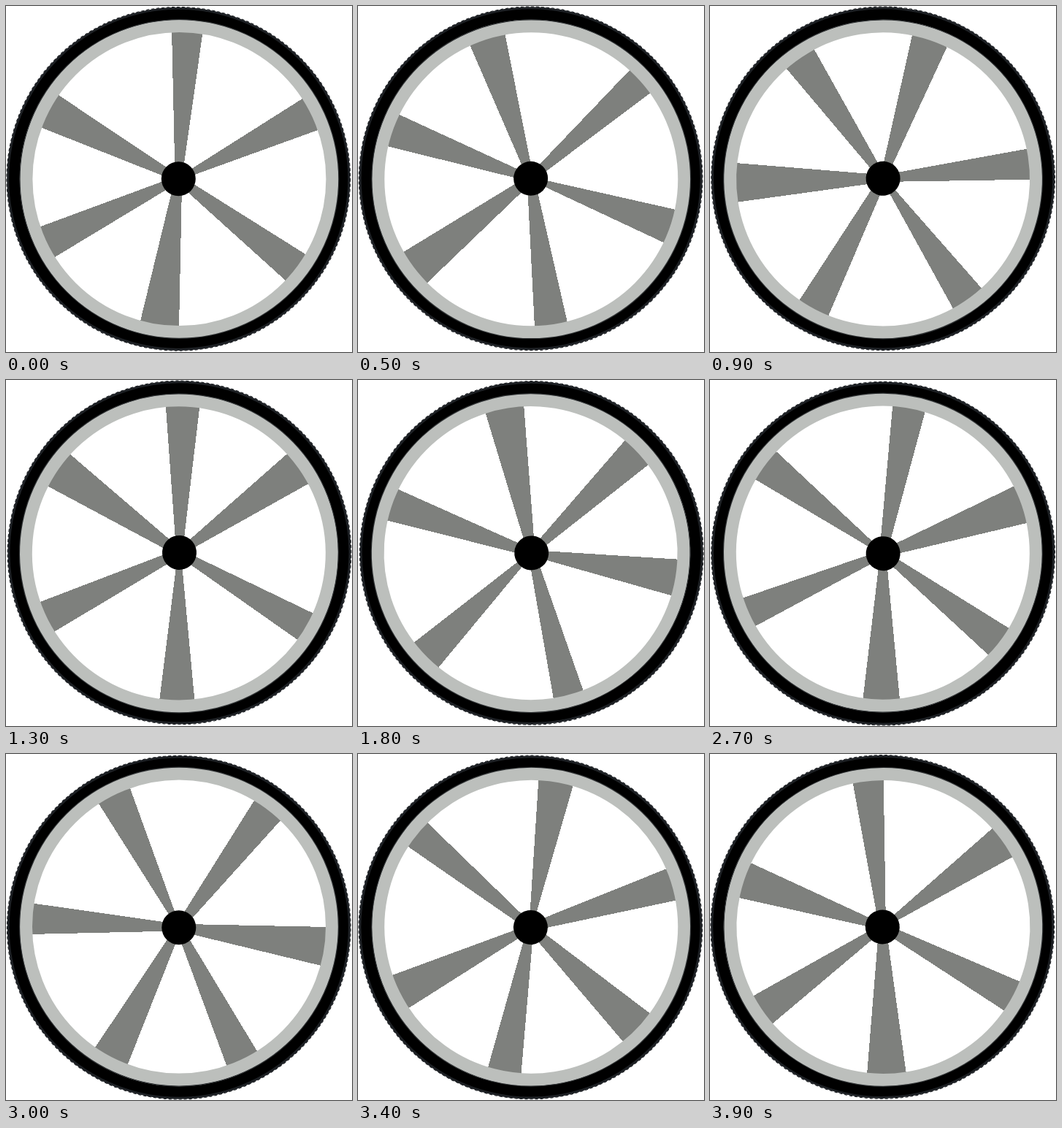
Animation of 474 by 474 pixels, one loop 4 s. Source, as an HTML page:

```html
<!DOCTYPE html>
<html lang="en">
<head>
<meta charset="utf-8">
<title>Turning wheel</title>
<style>
  html, body { margin: 0; width: 100%; height: 100%; overflow: hidden; background: #fff; }
  svg { display: block; width: 100vw; height: 100vh; }
</style>
</head>
<body>
<svg viewBox="0 0 474 474">
  <g id="wheel" fill="none">
    <!-- tyre -->
    <circle r="225.5" stroke="#000" stroke-width="16"/>
    <circle r="233.6" stroke="#1d2024" stroke-width="3"/>
    <circle r="235.3" stroke="#1d2024" stroke-width="1.2" stroke-dasharray="4 3"/>
    <g id="spokes" fill="#7e807d" shape-rendering="crispEdges"></g>
    <!-- rim -->
    <g transform="translate(1.1 .2)">
      <circle r="218.2" stroke="#2e3133" stroke-width="1.6"/>
      <circle r="209.4" stroke="#bcbfbc" stroke-width="16.8"/>
    </g>
    <circle r="23.5" fill="#000"/>
  </g>
</svg>
<script>
const LOOP = 4000, STEP = 100, CENTER = 237;
const HUB_R = 22, RIM_R = 204;

// [direction clockwise from up, half spread at the rim (degrees), half width at the hub]
const SPOKES = [
  [3.4, 6, 6.5], [63.9, 6.8, 4.5], [127.1, 6.4, 7],
  [187.4, 7.6, 7.3], [244.3, 6.6, 6.3], [297.7, 7.2, 6.3]
];

const wheel = document.getElementById('wheel');
const spokes = document.getElementById('spokes');

for (const [dir, spread, root] of SPOKES) {
  const a = spread * Math.PI / 180;
  const x = RIM_R * Math.sin(a), y = -RIM_R * Math.cos(a);
  const p = document.createElementNS('http://www.w3.org/2000/svg', 'path');
  p.setAttribute('d', `M${-root} ${-HUB_R}L${-x} ${y}H${x}L${root} ${-HUB_R}L0 0Z`);
  p.setAttribute('transform', `rotate(${dir})`);
  spokes.append(p);
}

// The wheel sits slightly off its axis, so it wobbles as it turns.
function draw(ms) {
  const step = Math.floor((ms % LOOP) / STEP);
  const angle = step * 360 * STEP / LOOP;
  wheel.setAttribute('transform',
    `translate(${CENTER} ${CENTER}) rotate(${angle}) translate(-.7 -.2)`);
}

const start = performance.now();
function tick() {
  draw(performance.now() - start);
  requestAnimationFrame(tick);
}
draw(0);
requestAnimationFrame(tick);
</script>
</body>
</html>
```
